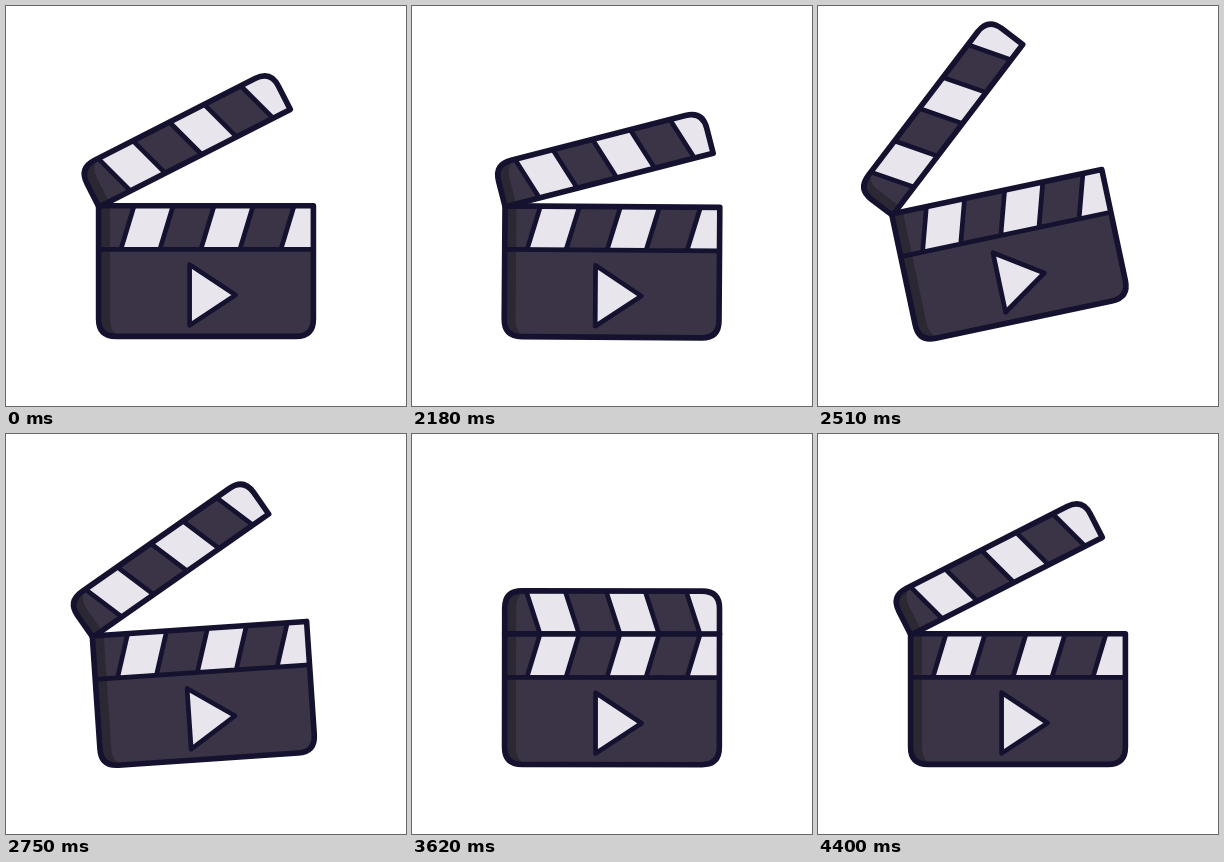
Recreate the animation shown at these times as an HTML page. Size 400 px wide and 400 px high, loop 4.49 s.

```html
<!DOCTYPE html>
<html lang="en">
<head>
<meta charset="utf-8">
<title>Clapperboard</title>
<style>
  html, body { margin: 0; width: 100%; height: 100%; overflow: hidden; background: #fff; }
  svg { display: block; width: 100%; height: 100%; }
  .line { fill: none; stroke: #14122f; stroke-width: 4.7; stroke-linejoin: round; stroke-linecap: round; }
  .edge { stroke-width: 5.6; }
  .dark { fill: #3a3446; }
  .shade { fill: #2b2834; }
  .light { fill: #e9e5ed; }
</style>
</head>
<body>
<svg viewBox="0 0 400 400">
  <defs>
    <path id="armShape" d="M92.6 200.3V174Q92.6 156.8 110 156.8H290Q307.4 156.8 307.4 174V200.3Z"/>
    <path id="bodyShape" d="M92.6 199.7H307.4V313Q307.4 330.4 290 330.4H110Q92.6 330.4 92.6 313Z"/>
    <clipPath id="armClip"><use href="#armShape"/></clipPath>
  </defs>
  <g id="board">
    <g id="arm">
      <use href="#armShape" class="dark"/>
      <g clip-path="url(#armClip)">
        <path class="shade" d="M92 200V157H116Q104 159 104 174V200Z"/>
        <path class="light" d="M114 157H153L167 200H128ZM194 157H233L247 200H208ZM274 157H310V200H288Z"/>
        <path class="line" d="M114 157L128 200M153 157L167 200M194 157L208 200M233 157L247 200M274 157L288 200"/>
      </g>
      <use href="#armShape" class="line edge"/>
    </g>
    <use href="#bodyShape" class="dark"/>
    <path class="shade" d="M93 200H104V313Q104 327 114 330H110Q93 330 93 313Z"/>
    <path class="light" d="M128 200H167L154 243H115ZM208 200H247L234 243H195ZM288 200H307V243H275Z"/>
    <path class="line" d="M128 200L115 243M167 200L154 243M208 200L195 243M247 200L234 243M288 200L275 243M93 243.3H307"/>
    <path class="light" d="M183.6 258.6V319.4L229.6 289Z"/>
    <path class="line" d="M183.6 258.6V319.4L229.6 289Z"/>
    <use href="#bodyShape" class="line edge"/>
  </g>
</svg>
<script>
  const LOOP = 4490, STEP = 30;
  const board = document.getElementById('board');
  const arm = document.getElementById('arm');

  const swing = p => (1 - Math.cos(Math.PI * p)) / 2;
  const bump = p => Math.sin(Math.PI * p) ** 2;
  const out = k => p => 1 - (1 - p) ** k;

  // Each part: start, end, from, to, easing
  const tilt = [
    [2000, 2140, 0, 4.4, swing],
    [2140, 2540, 4.4, -12, out(2.65)],
    [2550, 3080, -12, 0, out(2.38)],
    [3600, 3840, 0, 4.4, swing],
    [3840, 4130, 4.4, 0, out(2)]
  ];
  const opening = [
    [2030, 2200, 27, 14.4, swing],
    [2200, 2560, 14.4, 42, swing],
    [2580, 3080, 42, 0, swing],
    [3095, 3320, 0, 1.6, bump],
    [3875, 4135, 0, 35.5, swing],
    [4135, 4400, 35.5, 27, swing]
  ];

  function valueAt(parts, t) {
    let v = parts[0][2];
    for (const [start, end, from, to, ease] of parts) {
      if (t < start) break;
      v = from + (to - from) * ease(Math.min(1, (t - start) / (end - start)));
    }
    return v;
  }

  function draw(ms) {
    const t = Math.floor((ms % LOOP + 10) / STEP) * STEP - 10;
    const a = valueAt(tilt, t);
    const pivot = a > 0 ? '75 260' : '123 294';
    board.setAttribute('transform', `rotate(${a} ${pivot})`);
    arm.setAttribute('transform', `rotate(${-valueAt(opening, t)} 94 200)`);
  }

  let begin;
  function tick(now) {
    begin ??= now;
    draw(Math.max(0, now - begin));
    requestAnimationFrame(tick);
  }
  draw(0);
  requestAnimationFrame(tick);
</script>
</body>
</html>
```
